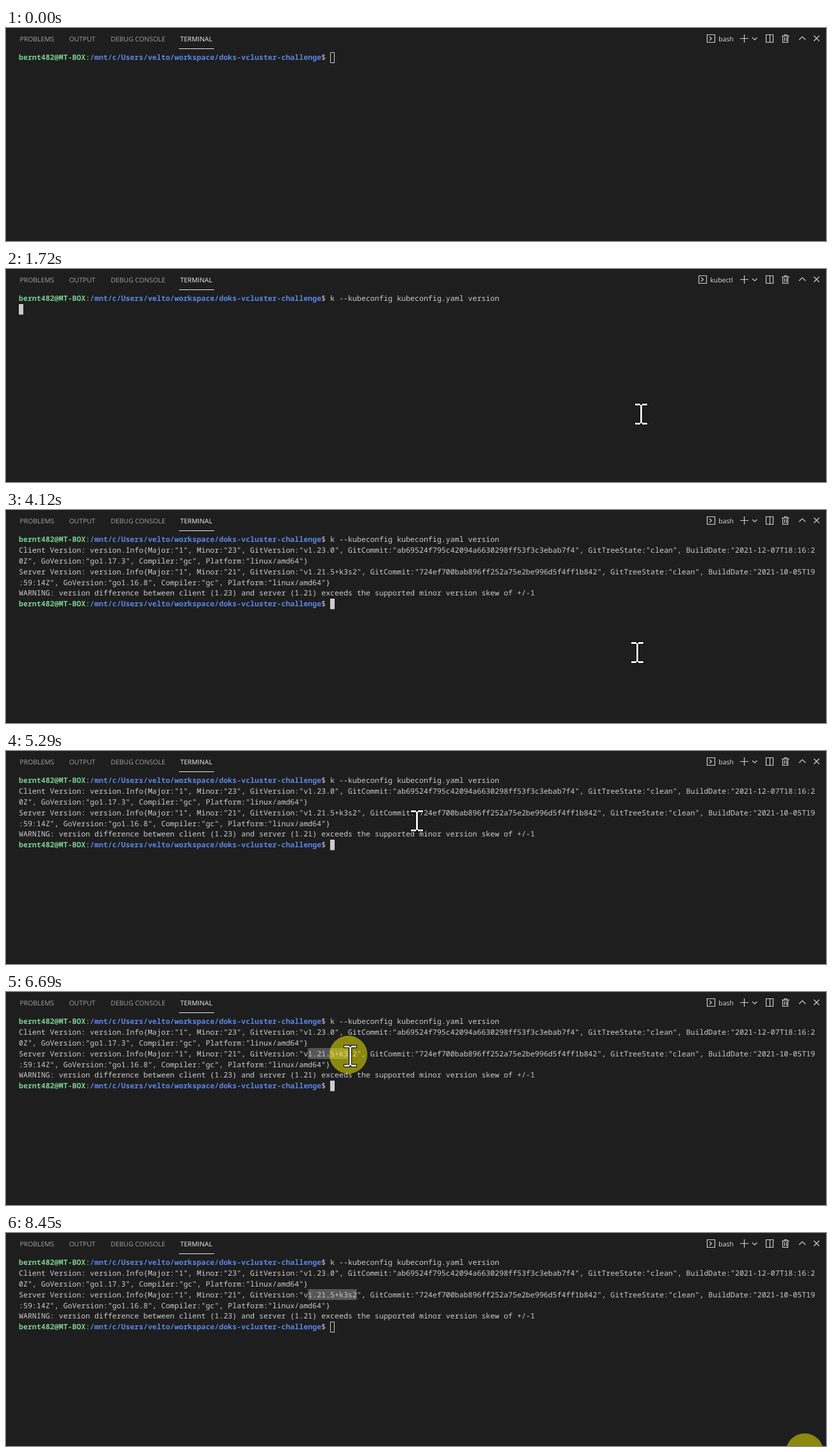
Write an HTML page with a canvas that moves like this. It is 1280 px wide and 334 px high and loops after 8520 ms.

```html
<!DOCTYPE html>
<html lang="en">
<head>
<meta charset="utf-8">
<title>Terminal</title>
<style>
html, body { margin: 0; width: 100%; height: 100%; overflow: hidden; background: #1e1e1e; }
canvas { display: block; }
</style>
</head>
<body>
<canvas id="stage" width="1280" height="334"></canvas>
<script>
const ctx = document.getElementById('stage').getContext('2d');
const LOOP = 8520, LEFT = 20, TOP = 38, CELL = 6.944, LINE = 16.83;
const FG = '#cccccc', GREEN = '#7ccf90', BLUE = '#5b86e5';
const COMMAND = 'k --kubeconfig kubeconfig.yaml version';
const OUTPUT = [
  'Client Version: version.Info{Major:"1", Minor:"23", GitVersion:"v1.23.0", GitCommit:"ab69524f795c42094a6630298ff53f3c3ebab7f4", GitTreeState:"clean", BuildDate:"2021-12-07T18:16:2',
  '0Z", GoVersion:"go1.17.3", Compiler:"gc", Platform:"linux/amd64"}',
  'Server Version: version.Info{Major:"1", Minor:"21", GitVersion:"v1.21.5+k3s2", GitCommit:"724ef700bab896ff252a75e2be996d5f4ff1b842", GitTreeState:"clean", BuildDate:"2021-10-05T19',
  ':59:14Z", GoVersion:"go1.16.8", Compiler:"gc", Platform:"linux/amd64"}',
  'WARNING: version difference between client (1.23) and server (1.21) exceeds the supported minor version skew of +/-1'
];

// The pointer glides through evenly timed points and rests between moves
const MOVES = [
  { from: 70, to: 330, via: [[1091, 267], [991, 227]] },
  { from: 4120, to: 4970, via: [[985, 223], [322, 50], [610, 97]] },
  { from: 5050, to: 5870, via: [[676, 106], [654.5, 110.5], [600, 108], [540, 102], [471, 96]] },
  { from: 5930, to: 6750, via: [[476.5, 97], [543, 100.5]] },
  { from: 6830, to: 6950, via: [[545, 100.5], [549.5, 100.5]] },
  { from: 7160, to: 8000, via: [[560, 103], [830, 157], [990, 212], [1130, 265], [1225.5, 312.5]] },
  { from: 8060, to: 8180, via: [[1228, 322], [1232, 352]] }
];

function pointer(t) {
  const move = MOVES.filter(m => m.from <= t).pop();
  if (!move) return null;
  const { from, to, via } = move;
  const steps = Math.round((to - from) / 65);
  const step = Math.floor((t - from) / (to - from) * steps + 0.3);
  const u = Math.min(1, step / steps) * (via.length - 1);
  const i = Math.min(Math.floor(u), via.length - 2);
  return via[i].map((v, axis) => v + (via[i + 1][axis] - v) * (u - i));
}

function rect(color, x, y, w, h) {
  ctx.fillStyle = color;
  ctx.fillRect(x, y, w, h);
}

function stroke(d, width = 1.2) {
  ctx.strokeStyle = FG;
  ctx.lineWidth = width;
  ctx.stroke(new Path2D(d));
}

function label(s, x, color) {
  ctx.font = '10.4px "Open Sans", "Noto Sans", sans-serif';
  ctx.fillStyle = color;
  ctx.fillText(s, x, 20.5);
}

function cells(s, col, row, color = FG, weight = 500) {
  ctx.font = `${weight} 11.573px "Noto Sans Mono", monospace`;
  ctx.fillStyle = color;
  [...s].forEach((c, i) => {
    if (c !== ' ') ctx.fillText(c, LEFT + (col + i) * CELL, TOP + 12.2 + row * LINE);
  });
}

function prompt(row) {
  cells('bernt482@MT-BOX', 0, row, GREEN, 'bold');
  cells(':', 15, row);
  cells('/mnt/c/Users/velto/workspace/doks-vcluster-challenge', 16, row, BLUE, 'bold');
  cells('$', 68, row);
}

function caret(col, row, solid) {
  const x = Math.round(LEFT + col * CELL), y = Math.round(TOP + row * LINE);
  if (solid) rect(FG, x, y, 7, 16.5);
  else stroke(`M${x + .5} ${y + .5}h6v16h-6z`, 1);
}

function header(shell) {
  label('PROBLEMS', 21.5, '#a2a2a2');
  label('OUTPUT', 98.5, '#a2a2a2');
  label('DEBUG CONSOLE', 163.5, '#a2a2a2');
  label('TERMINAL', 272, '#f0f0f0');
  rect('#e7e7e7', 270, 32, 55, 1);
  const x = shell === 'bash' ? 1094 : 1081;
  stroke(`M${x + .5} 10.5h12v12h-12zM${x + 4} 13.5l3.5 3l-3.5 3`);
  label(shell, x + 18.3, '#dddddd');
  stroke('M1146 16.5h13M1152.5 10v13');
  stroke('M1165 15l3.7 3.7l3.7 -3.7');
  stroke('M1186.5 10.5h11v12h-11zM1192.5 10.5v12');
  stroke('M1211 12.5h12M1215 12v-1.5h4v1.5M1212.5 12.5v10h8v-10M1215.5 14.5v6M1218.5 14.5v6');
  stroke('M1238 18.5l5 -5l5 5');
  stroke('M1261 12l8.5 8.5m0 -8.5l-8.5 8.5');
}

function click(x, y) {
  ctx.fillStyle = 'rgba(248, 242, 0, .5)';
  ctx.beginPath();
  ctx.arc(x, y, 29.7, 0, 7);
  ctx.fill();
}

function beam(x, y) {
  for (const [color, edge] of [['#000', 1], ['#f0f0f0', 0]]) {
    const bar = (dx, dy, w, h) =>
      rect(color, x + dx - edge, y + dy - edge, w + 2 * edge, h + 2 * edge);
    bar(-1.5, -14.5, 3, 29);
    for (const dy of [-16.5, 13.5]) {
      bar(-9.5, dy, 8, 3);
      bar(1.5, dy, 8, 3);
    }
  }
}

function draw(t) {
  const mouse = pointer(t);
  const focused = t >= 330 && t < 8450;
  rect('#1e1e1e', 0, 0, 1280, 334);
  header(t >= 1720 && t < 2530 ? 'kubectl' : 'bash');

  if (t >= 5930) {
    const end = Math.min(76, Math.round((mouse[0] - 3.5 - LEFT) / CELL));
    rect('#565656', LEFT + 65 * CELL, Math.round(TOP + 3 * LINE), (end - 65) * CELL, 17);
  }

  prompt(0);
  if (t >= 1070) cells(COMMAND, 70, 0);
  if (t >= 2340) {
    OUTPUT.forEach((s, i) => cells(s, 0, i + 1));
    prompt(6);
    caret(70, 6, focused);
  } else if (t >= 1650) caret(0, 1, true);
  else caret(t < 1070 ? 70 : 108, 0, focused);

  if (t >= 8450) click(1246.7, 344);
  else if (t >= 330 && t < 470 || t >= 5930 && t < 7160) click(mouse[0] - 3.5, mouse[1] - 2);
  if (mouse) beam(...mouse.map(v => Math.round(v - .5) + .5));
}

function tick() {
  draw(performance.now() % LOOP);
  requestAnimationFrame(tick);
}
ctx.textRendering = 'geometricPrecision';
tick();
</script>
</body>
</html>
```
